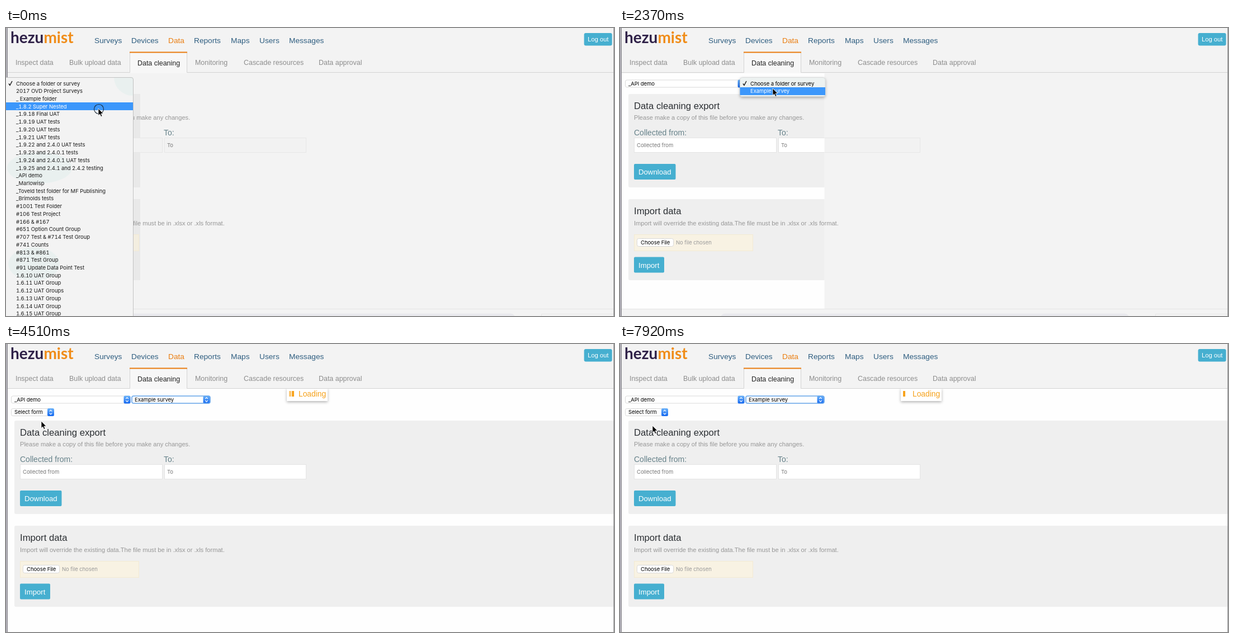
Write an HTML page that moves like this. It is 1087x515 px and loops after 8000 ms.

```html
<!DOCTYPE html>
<html lang="en">
<head>
<meta charset="utf-8">
<title>Data cleaning</title>
<style>
html, body { margin: 0; width: 100%; height: 100%; overflow: hidden; background: #f3f3f3; }
svg { display: block; width: 1087px; height: 515px; }
text { font-family: "Liberation Sans", Arial, sans-serif; white-space: pre; }
.ui text, text.ui { font-family: Inter, Roboto, sans-serif; font-size: 9.5px; letter-spacing: -.06px; font-variant-numeric: tabular-nums; }
.logo { font: 700 28px Lato, sans-serif; fill: #2f2148; }
.nav { font-size: 13.7px; fill: #2f5e80; }
.tabs { font-size: 12.45px; fill: #8d8d8d; }
.head { font-size: 16.7px; fill: #2b2f33; }
.note { font-size: 11.08px; fill: #979797; }
.label { font-size: 14px; fill: #66828a; }
.hint { fill: #777; }
.btn { fill: #46afd0; }
.btnText { font-size: 13.2px; fill: #fff; }

.grey { --panel: none; --field: #f2f2f2; --edge: #e7e7e7; --file: #f3eee0; }
.white { --panel: #efefef; --field: #fff; --edge: #e4e4e4; --file: #f8f2e3; }
.panel { fill: var(--panel); }
.field { fill: var(--field); stroke: var(--edge); }
.file { fill: var(--file); stroke: #f3ead3; }
.box { fill: #fff; stroke: #d9d9d9; }
.focus { fill: none; stroke: #6aa9ee; stroke-width: 1.6; }
.blue { fill: #3c97fb; }

/* 1% of the loop is 80 ms */
.t { animation: 8s step-end -8ms infinite; }
#first { animation-name: first; }
#second { animation-name: second; }
#final { animation-name: final; }
#menu { animation-name: menu; }
#swept { animation-name: swept; }
#menu2 { animation-name: menu2; }
#pick1 { animation-name: pick1; }
#pick2 { animation-name: pick2; }
#chosen1, #select2 { animation-name: after1; }
#chosen2 { animation-name: after2; }
#focus1 { animation-name: focus1; }
#focus2 { animation-name: focus2; }
.row { animation-name: row; }
#option { animation-name: option; }
#cursor { animation-name: cursor; }
#ring { animation-name: ring; }
@keyframes first { 0%, 19.25%, to { visibility: hidden } 15.375% { visibility: visible } }
@keyframes second { 0%, 37.5%, to { visibility: hidden } 19.25% { visibility: visible } }
@keyframes final { 0% { visibility: hidden } 37.5%, to { visibility: visible } }
@keyframes menu { 0% { opacity: 1 } 15.375% { opacity: .45 } 17.125% { opacity: .06 } 19.25%, to { opacity: 0 } }
@keyframes swept { 0% { opacity: 0 } 1.875%, to { opacity: .6 } }
@keyframes menu2 { 0% { opacity: 0 } 25.5% { opacity: 1 } 33.375% { opacity: .4 } 35.25%, to { opacity: 0 } }
@keyframes pick1 { 0% { visibility: visible } 19.25%, to { visibility: hidden } }
@keyframes pick2 { 0%, 35.25%, to { visibility: hidden } 19.25% { visibility: visible } }
@keyframes after1 { 0% { visibility: hidden } 19.25%, to { visibility: visible } }
@keyframes after2 { 0% { visibility: hidden } 35.25%, to { visibility: visible } }
@keyframes focus1 { 0% { visibility: visible } 23.375%, to { visibility: hidden } }
@keyframes focus2 { 0% { visibility: hidden } 25.5%, to { visibility: visible } }
@keyframes row {
  0% { transform: translateY(41px) }
  1.875% { transform: translateY(69px) }
  3.875% { transform: translateY(96px) }
  5.875% { transform: translateY(137px) }
  7.875%, to { transform: translateY(165px) }
}
@keyframes option { 0% { transform: translateY(-14px) } 29.625%, to { transform: none } }
@keyframes cursor {
  0% { transform: translate(165px, 144px) }
  1.875% { transform: translate(166px, 162px) }
  3.875% { transform: translate(166px, 200px) }
  5.875% { transform: translate(167px, 238px) }
  7.875% { transform: translate(167px, 264px) }
  15.375% { transform: translate(220px, 180px) }
  17.125% { transform: translate(265px, 107px) }
  19.25% { transform: translate(272px, 104px) }
  23.375% { transform: translate(280px, 100px) }
  27.625% { transform: translate(277px, 103px) }
  29.625% { transform: translate(273px, 108px) }
  37.5% { transform: translate(255px, 110px) }
  39.375% { transform: translate(205px, 113px) }
  41.375% { transform: translate(150px, 116px) }
  43.25% { transform: translate(102px, 118px) }
  45.25% { transform: translate(73px, 118px) }
  50.875% { transform: translate(72px, 122px) }
  52.75% { transform: translate(68px, 130px) }
  54.625% { transform: translate(63px, 138px) }
  56.5%, to { transform: translate(58px, 146px) }
}
@keyframes ring {
  0%, 13.5%, 31.5% { visibility: visible }
  1.875%, 15.375%, 33.375%, to { visibility: hidden }
}

/* nine loader turns per loop */
.bar { fill: #f8a31c; animation: 888.889ms step-end -85ms infinite; }
#bar1 { animation-name: bar1; }
#bar2 { animation-name: bar2; }
#bar3 { animation-name: bar3; }
@keyframes bar1 { 0% { opacity: 1 } 16% { opacity: .6 } 33% { opacity: .2 } 50%, to { opacity: 0 } }
@keyframes bar2 { 0%, 67%, to { opacity: 0 } 16% { opacity: 1 } 33% { opacity: .5 } 50% { opacity: .2 } }
@keyframes bar3 { 0%, 67%, to { opacity: 0 } 33% { opacity: 1 } 50% { opacity: .5 } }
</style>
</head>
<body>
<svg viewBox="0 0 1087 515">
  <defs>
    <g id="panels">
      <rect class="panel" x="15" y="118" width="1072" height="167" rx="3"/>
      <text class="head" x="25" y="145">Data cleaning export</text>
      <text class="note" x="25" y="164">Please make a copy of this file before you make any changes.</text>
      <text class="label" x="25" y="191.5">Collected from:</text>
      <text class="label" x="282" y="191.5">To:</text>
      <rect class="field" x="25.5" y="196.5" width="254" height="26"/>
      <rect class="field" x="283.5" y="196.5" width="253" height="26"/>
      <text class="ui hint" x="30" y="213">Collected from</text>
      <text class="ui hint" x="288" y="213">To</text>
      <rect class="btn" x="25" y="243" width="74.5" height="28" rx="2"/>
      <text class="btnText" x="33" y="262">Download</text>
      <rect class="panel" x="15" y="306" width="1072" height="145" rx="3"/>
      <text class="head" x="25" y="333">Import data</text>
      <text class="note" x="25" y="353">Import will override the existing data.The file must be in .xlsx or .xls format.</text>
      <rect class="file" x="25.5" y="369.5" width="212" height="29"/>
      <rect class="box" x="30.5" y="376.5" width="65" height="14" rx="3"/>
      <text class="ui" x="37" y="387">Choose File</text>
      <text class="ui" x="100" y="387" fill="#999">No file chosen</text>
      <rect class="btn" x="25" y="409.5" width="54" height="28" rx="2"/>
      <text class="btnText" x="33" y="428.5">Import</text>
    </g>
    <g id="rows" class="ui"></g>
    <g id="arrow">
      <rect width="12" height="14" rx="2.5" fill="url(#shine)"/>
      <path d="M3.7 5.6 6 3.2 8.3 5.6M3.7 8.4 6 10.8 8.3 8.4" fill="none" stroke="#fff" stroke-width="1.2"/>
    </g>
    <path id="tick" d="M0 4.5 2 7.5 6 0" fill="none" stroke="#111" stroke-width="1.4"/>
    <linearGradient id="shine" x2="0" y2="1">
      <stop stop-color="#6cb3fa"/><stop offset="1" stop-color="#1468f0"/>
    </linearGradient>
    <filter id="shadow" x="-20%" y="-40%" width="140%" height="200%">
      <feDropShadow dx="0" dy="2" stdDeviation="2.5" flood-opacity=".3"/>
    </filter>
    <clipPath id="cut1"><rect y="81" width="277" height="434"/></clipPath>
    <clipPath id="cut2"><rect y="81" width="365.5" height="421"/></clipPath>
    <clipPath id="cutMenu"><rect y="88" width="227" height="427"/></clipPath>
    <clipPath id="cutRow"><rect class="t row" y="92" width="227" height="14"/></clipPath>
  </defs>

  <rect width="1087" height="515" fill="#f3f3f3"/>
  <path d="M15 118H240V285H15zM15 306H240V451H15z" fill="#e9e9e9"/>
  <use href="#panels" class="grey"/>
  <path d="M3 502.5H1087" stroke="#e5e5e5"/>
  <rect x="180" y="510.5" width="730" height="20" rx="8" fill="#e9e9ed"/>
  <rect x="957.5" y="511.5" width="140" height="20" fill="none" stroke="#e7e7e7"/>

  <g id="first" class="t"><g class="white" clip-path="url(#cut1)">
    <rect width="1087" height="515" fill="#fdfdfd"/><use href="#panels"/>
  </g></g>
  <g id="second" class="t"><g class="white" clip-path="url(#cut2)">
    <rect width="1087" height="515" fill="#fefefe"/><use href="#panels"/>
  </g></g>
  <g id="final" class="t white">
    <rect y="80" width="1087" height="435" fill="#fefefe"/>
    <use href="#panels" y="19"/>
    <g class="ui">
      <rect class="box" x="9.5" y="115.5" width="76" height="13" rx="3"/>
      <text x="15" y="125.3">Select form</text>
      <use href="#arrow" x="74" y="115"/>
    </g>
    <g filter="url(#shadow)"><rect x="502" y="79" width="73" height="23" rx="1" fill="#fff"/></g>
    <rect id="bar1" class="bar" x="506" y="84" width="4" height="10"/>
    <rect id="bar2" class="bar" x="511" y="84" width="4" height="10"/>
    <rect id="bar3" class="bar" x="516" y="84" width="4" height="10"/>
    <text x="523" y="94" font-size="13.8" fill="#f5a11b">Loading</text>
  </g>

  <rect width="1087" height="79" fill="#f3f3f3"/>
  <path d="M3 79.5H221.5V44M323.5 44V79.5H1087" fill="none" stroke="#d3d3d3"/>
  <rect x="222" y="45" width="101" height="36" fill="#f7f7f7"/>
  <rect x="221" y="42.5" width="103" height="2" fill="#ea7d10"/>
  <text class="logo" x="8" y="27">hezu<tspan fill="#f08c18">mist</tspan></text>
  <g class="nav">
    <text x="158" y="27">Surveys</text>
    <text x="224" y="27">Devices</text>
    <text x="290" y="27" fill="#ea7d10">Data</text>
    <text x="336" y="27">Reports</text>
    <text x="402" y="27">Maps</text>
    <text x="453" y="27">Users</text>
    <text x="506" y="27">Messages</text>
  </g>
  <g class="tabs">
    <text x="17" y="66">Inspect data</text>
    <text x="113" y="66">Bulk upload data</text>
    <text x="235" y="66.5" fill="#222">Data cleaning</text>
    <text x="338" y="66">Monitoring</text>
    <text x="425" y="66">Cascade resources</text>
    <text x="559" y="66">Data approval</text>
  </g>
  <rect class="btn" x="1033.5" y="9" width="50" height="22.5" rx="3"/>
  <text x="1040" y="24.3" font-size="11.2" fill="#fff">Log out</text>
  <path d="M1.5 0V515" stroke="#b4b2ba" stroke-width="3"/>
  <path d="M2.5 0V515" stroke="#85858a"/>
  <path d="M1086.5 0V515" stroke="#949496"/>

  <g class="ui">
    <rect class="box" x="9.5" y="93" width="213" height="13" rx="3"/>
    <rect id="focus1" class="t focus" x="9.5" y="93" width="213" height="13" rx="3"/>
    <use href="#arrow" x="210.5" y="92.5"/>
    <text id="pick1" class="t" x="15" y="103">Choose a folder or survey</text>
    <text id="chosen1" class="t" x="15" y="103">_API demo</text>
    <g id="select2" class="t">
      <rect class="box" x="225" y="93" width="140" height="13" rx="3"/>
      <use href="#arrow" x="352.5" y="92.5"/>
    </g>
    <rect id="focus2" class="t focus" x="225" y="93" width="140" height="13" rx="3"/>
    <text id="pick2" class="t" x="230" y="103">Choose a folder or survey</text>
    <text id="chosen2" class="t" x="230" y="103">Example survey</text>
  </g>

  <g id="menu" class="t">
    <g clip-path="url(#cutMenu)">
      <rect y="88" width="227" height="427" fill="#f3f3f3"/>
      <g fill="#bfe6e2" opacity=".18">
        <circle cx="226" cy="88" r="33"/>
        <ellipse cx="60" cy="250" rx="58" ry="28"/>
        <ellipse cx="50" cy="422" rx="46" ry="30"/>
      </g>
      <rect id="swept" class="t" y="133" width="227" height="147" fill="#efefef"/>
    </g>
    <path d="M0 88.5H224Q227.5 88.5 227.5 92V515" fill="none" stroke="#c2c2c2"/>
    <use href="#tick" x="5" y="95"/>
    <use href="#rows" fill="#1c1c1c"/>
    <rect class="t row blue" y="92" width="227" height="14"/>
    <g clip-path="url(#cutRow)"><use href="#rows" fill="#fff"/></g>
  </g>

  <g id="menu2" class="t ui">
    <rect x="214.5" y="88.5" width="152.5" height="34" rx="4" fill="#edf2f1" stroke="#c9cdcd" stroke-width=".6" filter="url(#shadow)"/>
    <rect id="option" class="t blue" x="214.5" y="106" width="152.5" height="14"/>
    <use href="#tick" x="220" y="95"/>
    <text x="233" y="102.5">Choose a folder or survey</text>
    <text x="233" y="116.2" fill="#fff">Example survey</text>
  </g>

  <g id="cursor" class="t">
    <circle id="ring" class="t" cx="1" cy="1" r="8.5" fill="none" stroke="#1c2b3a" stroke-width="1.1"/>
    <path d="M0 0V12.5L2.8 9.9 4.9 14.5 7 13.5 5 9.1H8.9Z" stroke="#fff" stroke-width=".8"/>
  </g>
</svg>
<script>
const groups = [10, 11, 12, 13, 14, 15].map(n => `1.6.${n} UAT Group${n === 12 ? "s" : ""}`);
const names = [
  "Choose a folder or survey", "2017 OVD Project Surveys", "_ Example folder",
  "_1.8.2 Super Nested", "_1.9.18 Final UAT", "_1.9.19 UAT tests",
  "_1.9.20 UAT tests", "_1.9.21 UAT tests", "_1.9.22 and 2.4.0 UAT tests",
  "_1.9.23 and 2.4.0.1 tests", "_1.9.24 and 2.4.0.1 UAT tests",
  "_1.9.25 and 2.4.1 and 2.4.2 testing", "_API demo", "_Marlowisp",
  "_Toveld test folder for MF Publishing", "_Brimolds tests",
  "#1001 Test Folder", "#106 Test Project", "#166 & #167",
  "#651 Option Count Group", "#707 Test & #714 Test Group", "#741 Counts",
  "#813 & #861", "#871 Test Group", "#91 Update Data Point Test", ...groups
];
const rows = document.getElementById("rows");
names.forEach((name, i) => {
  const text = document.createElementNS(rows.namespaceURI, "text");
  text.setAttribute("x", 18);
  text.setAttribute("y", 102.5 + 13.73 * i);
  text.textContent = name;
  rows.append(text);
});
</script>
</body>
</html>
```
